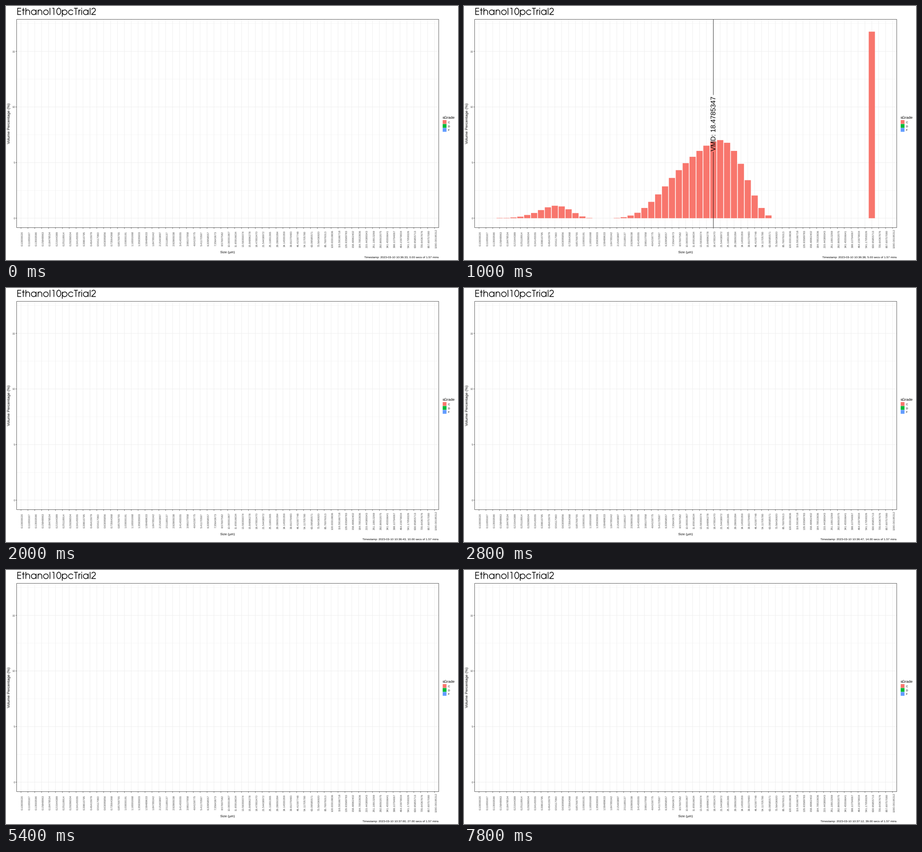
A matplotlib script for the animation above (8 s loop, 998x561 px).

```python
import numpy as np
import matplotlib.pyplot as plt
from matplotlib.animation import FuncAnimation
from matplotlib.patches import Rectangle

W, H = 998, 561
FRAMES, INTERVAL = 40, 200
PX = 0.72  # points per pixel at 100 dpi

LEFT, RIGHT, TOP, BOTTOM = 23.5, 955.5, 29.5, 489.5
X0, STEP = 33.1, 15.217
Y0, UNIT = 468.7, 24.57
RULE = 0.76  # stroke of border, ticks and major grid in pixels
INK, GREY, GRID = "#333333", "#4D4D4D", "#EBEBEB"
GRADES = {"C": "#F8766D", "D": "#00BA38", "F": "#619CFF"}
BURST = 5  # the only reading that holds data
VMD = 34

# first bin -> volume percentages of consecutive bins
VOLUMES = {
    3: [.03, .03, .07, .14, .29, .47, .73, .98, 1.12, 1.06, .80, .46, .16, .03],
    20: [.03, .09, .24, .49, .92, 1.47, 2.14, 2.86, 3.62, 4.32, 4.95, 5.52,
         6.05, 6.52, 6.90, 7.02, 6.78, 6.05, 4.89, 3.42, 2.04, .92, .25],
    57: [16.77],
}

plt.rcParams["font.family"] = "Liberation Sans"
plt.rcParams["text.hinting"] = "none"
plt.rcParams["path.snap"] = False
fig = plt.figure(figsize=(W / 100, H / 100), dpi=100, facecolor="white")
ax = fig.add_axes([0, 0, 1, 1])
ax.set_xlim(0, W)
ax.set_ylim(H, 0)
ax.axis("off")


def bin_x(i):
    return X0 + STEP * i


def vol_y(v):
    return Y0 - UNIT * v


def line(xs, ys, color, width, z):
    return ax.plot(xs, ys, color=color, lw=width * PX, zorder=z,
                   solid_capstyle="butt", solid_joinstyle="miter")[0]


def box(x, y, w, h, color):
    return ax.add_patch(Rectangle((x, y), w, h, fc=color, ec="none", lw=0, zorder=3))


def label(x, y, s, size, color="black", ha="left", angle=0):
    return ax.text(x, y, s, fontsize=size * PX, color=color, ha=ha,
                   va="baseline", rotation=angle, rotation_mode="anchor", zorder=6)


def arc(cx, cy, rx, ry, a, b):
    t = np.radians(np.linspace(a, b, 48))
    return list(zip(cx + rx * np.cos(t), cy + ry * np.sin(t)))


def bowl(cx, a=0, b=360):
    return arc(cx, .2735, .2515, .2515, a, b)


def stem(x, top, bottom=0):
    return [(x, bottom), (x, top)]


def arch():
    return [(.102, .3)] + arc(.305, .322, .203, .203, 180, 0) + [(.508, 0)]


# geometric sans letters in em units: advance, strokes
GLYPHS = {
    "E": (.536, [[(.482, .705), (.114, .705), (.114, .035), (.482, .035)],
                 [(.114, .39), (.475, .39)]]),
    "t": (.339, [stem(.17, .74), [(.029, .513), (.31, .513)]]),
    "h": (.61, [stem(.102, .74), arch()]),
    "a": (.683, [bowl(.3285), stem(.586, .547)]),
    "n": (.61, [stem(.102, .547), arch()]),
    "o": (.655, [bowl(.3275)]),
    "l": (.2, [stem(.1, .74)]),
    "1": (.554, [[(.15, .705), (.317, .705), (.317, 0)]]),
    "0": (.554, [arc(.277, .37, .213, .348, 0, 360)]),
    "p": (.682, [bowl(.3535), stem(.097, .547, -.192)]),
    "c": (.647, [bowl(.3265, 32, 328)]),
    "T": (.426, [[(.009, .705), (.417, .705)], stem(.213, .705)]),
    "r": (.301, [stem(.1, .547), arc(.25, .35, .15, .165, 180, 75)]),
    "i": (.2, [stem(.1, .547), stem(.1, .74, .645)]),
    "2": (.554, [arc(.272, .525, .19, .19, 170, -45) + [(.055, .035), (.507, .035)]]),
}


def draw_title(x, y, s, size):
    for ch in s:
        advance, strokes = GLYPHS[ch]
        for stroke in strokes:
            pts = np.array(stroke)
            line(x + size * pts[:, 0], y - size * pts[:, 1], "black", .07 * size, 6)
        x += advance * size


def draw_panel():
    for k in range(8):
        y = vol_y(2.5 * k)
        major = k % 2 == 0
        line([LEFT, RIGHT], [y, y], GRID, RULE if major else RULE / 2, 1)
        if major:
            line([LEFT - 2.3, LEFT], [y, y], INK, RULE, 4)
            label(LEFT - 3, y + 2.3, f"{2.5 * k:.0f}", 6.2, GREY, "right")
    for i in range(61):
        x = bin_x(i)
        line([x, x], [TOP, BOTTOM], GRID, RULE, 1)
        line([x, x], [BOTTOM, BOTTOM + 2.3], INK, RULE, 4)
        size = np.float32(10 ** (i / 15 - 1) * 1.00000195)
        label(x + 5.1, 514, f"{size:.8f}", 6.2, GREY, "center", 90)
    ax.add_patch(Rectangle((LEFT, TOP), RIGHT - LEFT, BOTTOM - TOP,
                           fill=False, ec=INK, lw=RULE * PX, zorder=5))


def draw_legend():
    label(964, 248.6, "sGrade", 8.4)
    for k, (name, color) in enumerate(GRADES.items()):
        y = 252 + 8.7 * k
        box(964.2, y, 8.4, 8.4, color)
        label(975.8, y + 7, name, 6.2)


def draw_burst():
    parts = []
    for first, values in VOLUMES.items():
        for i, v in enumerate(values, first):
            parts.append(box(bin_x(i) - .45 * STEP, vol_y(v), .9 * STEP,
                             UNIT * v, GRADES["C"]))
    x = bin_x(VMD)
    parts.append(line([x, x], [TOP, 196.5], "black", RULE, 4))
    parts.append(line([x, x], [322, BOTTOM], "black", RULE, 4))
    parts.append(label(x + 5, 259.5, "VMD: 18.4785347", 15, ha="center", angle=90))
    return parts


draw_title(23.4, 19.6, "Ethanol10pcTrial2", 20.85)
draw_panel()
draw_legend()
label(489, 545.4, "Size (µm)", 7.5, ha="center")
label(9.3, 259, "Volume Percentage (%)", 8.5, ha="center", angle=90)
burst = draw_burst()
caption = label(RIGHT, 556.4, "", 6.47, ha="right")


def update(n):
    minute, second = divmod(36 * 60 + 33 + n, 60)
    caption.set_text(f"Timestamp: 2023-03-10 10:{minute:02d}:{second:02d}, "
                     f"{n:.2f} secs of 1.57 mins")
    for part in burst:
        part.set_visible(n == BURST)
    return [caption, *burst]


anim = FuncAnimation(fig, update, frames=FRAMES, interval=INTERVAL,
                     init_func=lambda: update(0), repeat=True, repeat_delay=0)
plt.show()
```
